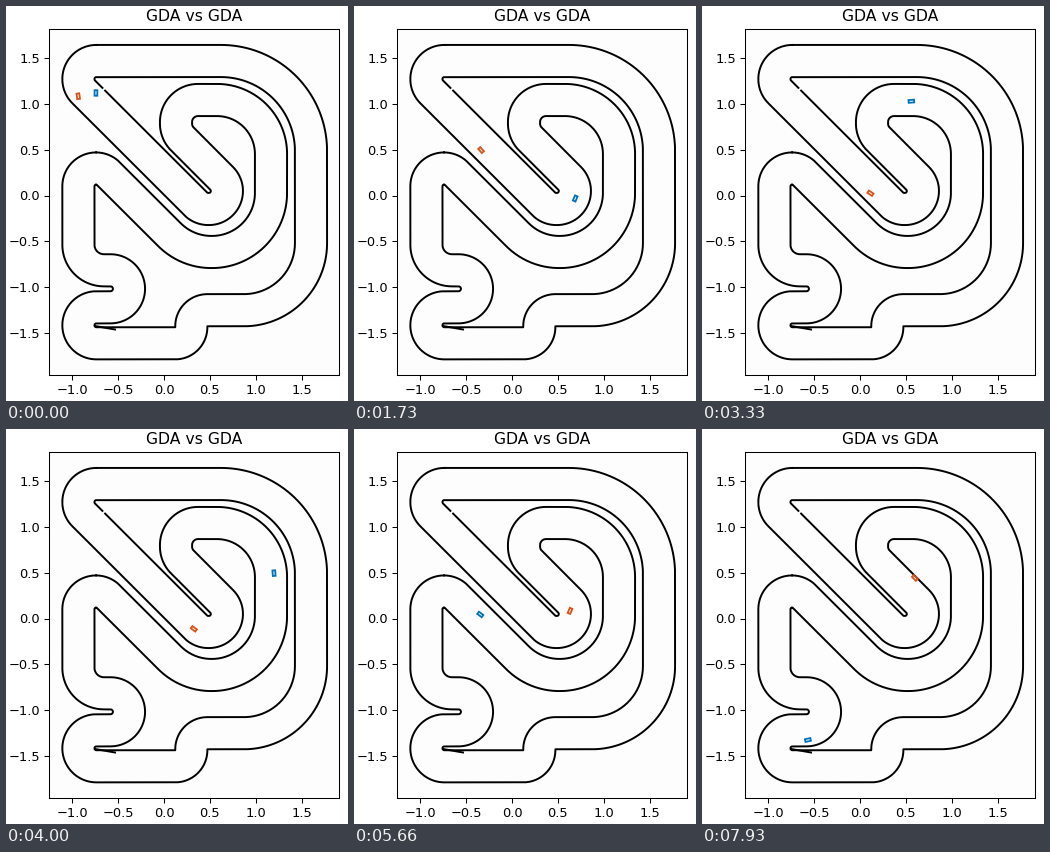
Recreate the animation shown at these times as a matplotlib script. Size 342 by 395 pixels, loop 8 s.

```python
import numpy as np
import matplotlib.pyplot as plt
from matplotlib.animation import FuncAnimation
from matplotlib.patches import Polygon

W, H = 342, 395
LOOP, FRAMES, STEPS = 8000, 400, 120     # the cars move in 120 held steps
X0, Y0, UNIT = 158, 189.5, 91.8          # pixel of the data origin, pixels per unit
LEFT, RIGHT, TOP, BOTTOM = 43, 333, 23, 369
S = 0.936                                # scale of the default text and line sizes
HALF = 0.175 * UNIT                      # half the track's width
ARC = 40                                 # points per bend

plt.rcParams.update({
    "font.family": "DejaVu Sans",
    "font.size": 10 * S,
    "axes.titlesize": 12 * S,
    "axes.titlepad": 6 * S,
    "axes.linewidth": 0.8 * S,
    "lines.linewidth": 1.5 * S,
    **{f"{a}tick.major.{k}": v * S for a in "xy"
       for k, v in (("size", 3.5), ("width", 0.8), ("pad", 3.5))},
})

# Corners of the track's centre line: x, y, bend radius (pixels)
TRACK = [
    (72.4, 55, 18), (72.4, 80.6, 18), (194.8, 203, 18), (220.9, 203, 18),
    (220.9, 177.6, 18), (170, 126.7, 22), (170, 94, 22), (265, 94, 54),
    (265, 246, 59), (180.8, 246, 59), (97.3, 162.5, 17.7), (72.4, 162.5, 17.7),
    (72.4, 264.3, 25.5), (123, 264.3, 18.5), (123, 301.3, 18.5),
    (72.4, 301.3, 18), (72.4, 337.3, 18), (185.3, 337.3, HALF),
    (185.3, 304.2, HALF), (305, 304.2, 67), (305, 55, 90),
]

# Key poses: time in ms, x, y (pixels)
ORANGE = [
    (0, 72, 90), (200, 72.5, 98), (860, 100, 117), (1730, 127, 144),
    (2660, 149, 172), (4000, 188, 200), (5660, 216, 182), (6800, 229, 166),
    (7930, 213, 149),
]
BLUE = [
    (0, 90, 87), (150, 90, 99), (900, 147, 160), (1730, 221, 193),
    (2660, 181, 130), (4000, 268, 144), (4330, 268, 189), (5200, 172, 230),
    (5660, 127, 186), (6060, 90, 170), (6800, 60, 223), (7400, 102, 268),
    (7930, 106, 311),
]


def to_data(p):
    return (np.asarray(p, float) - (X0, Y0)) * (1, -1) / UNIT


def bends(corners):
    """Points and right-hand normals along the rounded closed line."""
    pts = np.array(corners)[:, :2]
    line, normals = [], []
    for p, before, after, (_, _, r) in zip(
            pts, np.roll(pts, 1, 0), np.roll(pts, -1, 0), corners):
        u, v = ((q - p) / np.hypot(*(q - p)) for q in (before, after))
        half = np.arccos(u @ v) / 2
        center = p + (u + v) / np.hypot(*(u + v)) * r / np.sin(half)
        a, b = (np.arctan2(*(p + d * r / np.tan(half) - center)[::-1]) for d in (u, v))
        turn = (b - a + np.pi) % (2 * np.pi) - np.pi
        ang = a + turn * np.linspace(0, 1, ARC)
        radial = np.column_stack([np.cos(ang), np.sin(ang)])
        line.append(center + r * radial)
        normals.append(-np.sign(turn) * radial)
    return np.vstack(line), np.vstack(normals)


line, normals = bends(TRACK)
dist = np.append(0, np.cumsum(np.hypot(*np.diff(line, axis=0).T)))


def on_track(s):
    """Centre point and normal at distance s along the track."""
    return [np.column_stack([np.interp(s, dist, col) for col in a.T])
            for a in (line, normals)]


def drive(keys):
    """Position over time, eased in distance along and across the track."""
    keys = np.array(keys, float)
    t = keys[:, 0]
    grid = np.arange(0, dist[-1], 0.5)
    mid, side = on_track(grid)
    lane = []
    for p in keys[:, 1:]:
        i = np.argmin(np.hypot(*(mid - p).T))
        lane.append((grid[i], (p - mid[i]) @ side[i]))
    lane = np.array(lane)
    slope = np.gradient(lane, t, axis=0)

    def at(now):
        i = int(np.clip(np.searchsorted(t, now, "right") - 1, 0, len(t) - 2))
        h = t[i + 1] - t[i]
        f = np.clip((now - t[i]) / h, 0, 1)
        ease = f * f * (3 - 2 * f)
        s, d = (lane[i] * (1 - ease) + lane[i + 1] * ease
                + h * f * (1 - f) * (slope[i] * (1 - f) - slope[i + 1] * f))
        c, n = on_track([s])
        return to_data(c[0] + d * n[0])

    return at


fig = plt.figure(figsize=(W / 100, H / 100), dpi=100, facecolor="white")
ax = fig.add_axes([LEFT / W, 1 - BOTTOM / H, (RIGHT - LEFT) / W, (BOTTOM - TOP) / H],
                  facecolor="#fdfdfd")
(xmin, ymin), (xmax, ymax) = to_data([(LEFT, BOTTOM), (RIGHT, TOP)])
ax.set(xlim=(xmin, xmax), ylim=(ymin, ymax), title="GDA vs GDA",
       xticks=np.arange(-1, 1.6, 0.5), yticks=np.arange(-1.5, 1.6, 0.5))

outer = line + HALF * normals
# The inner wall starts and ends on the long diagonal, leaving a small gap
inner = np.roll(line - HALF * normals, -2 * ARC, axis=0)
run = inner[0] - inner[-1]
inner = np.vstack([inner[-1] + 0.09 * run, inner, inner[-1] + 0.066 * run])
spur = [(89, 320), (109, 323.5)]
for wall in (np.vstack([outer, outer[:1]]), inner, spur):
    ax.plot(*to_data(wall).T, color="black")

CAR = np.array([(-1, -1), (1, -1), (1, 1), (-1, 1)]) * (0.03, 0.015)
cars = []
for keys, color in ((ORANGE, "#D95319"), (BLUE, "#0072BD")):
    patch = Polygon(CAR, fill=False, edgecolor=color, linewidth=1.4 * S, zorder=3)
    ax.add_patch(patch)
    cars.append((patch, drive(keys)))


def update(k):
    now = int((k + 0.9) * STEPS / FRAMES) * LOOP / STEPS
    for patch, at in cars:
        dx, dy = at(now + 10) - at(now - 10)
        c, s = np.array([dx, dy]) / np.hypot(dx, dy)
        patch.set_xy(at(now) + CAR @ np.array([(c, s), (-s, c)]))
    return [patch for patch, _ in cars]


anim = FuncAnimation(fig, update, frames=FRAMES, interval=LOOP // FRAMES,
                     repeat=True, repeat_delay=0, blit=False)
plt.show()
```
